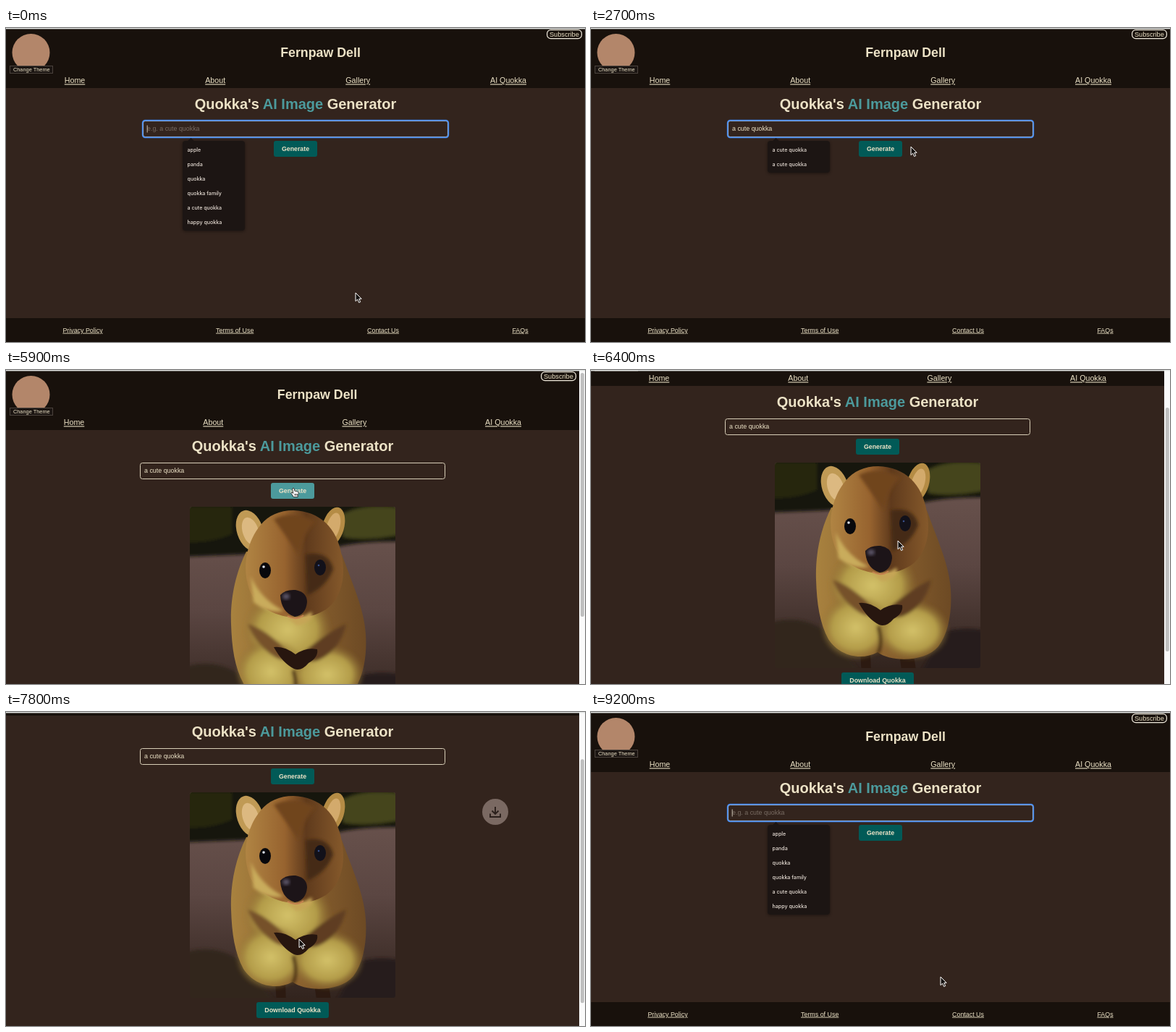
Animation of 800 by 434 pixels, one loop 9400 ms. Source, as an HTML page:

```html
<!DOCTYPE html>
<html lang="en">
<head>
<meta charset="utf-8">
<title>AI image generator</title>
<style>
  html, body { margin: 0; width: 100%; height: 100%; overflow: hidden; background: #33241d; }
  svg { display: block; width: 100vw; height: 100vh; }
  text { font-family: "Liberation Sans", Arial, sans-serif; fill: #ece2c6; white-space: pre; }
  .mid { text-anchor: middle; }
  .bold { font-weight: 700; }
  .link { text-decoration: underline; }
  .menu text { font: 500 7.1px Inter, "Liberation Sans", sans-serif; fill: #e8dfd6; }
</style>
</head>
<body>
<svg id="stage" viewBox="0 0 800 434">
  <defs>
    <linearGradient id="ground" x1="0" y1="0" x2="0" y2="1">
      <stop offset="0" stop-color="#6d5650"/>
      <stop offset=".5" stop-color="#5b4642"/>
      <stop offset="1" stop-color="#32241e"/>
    </linearGradient>
    <linearGradient id="fur" x1="0" y1="0" x2="1" y2="0">
      <stop offset="0" stop-color="#a8823f"/>
      <stop offset=".45" stop-color="#8f6531"/>
      <stop offset="1" stop-color="#6d4a24"/>
    </linearGradient>
    <linearGradient id="face" x1="0" y1="0" x2="1" y2="0">
      <stop offset="0" stop-color="#b08443"/>
      <stop offset=".4" stop-color="#97632f"/>
      <stop offset=".62" stop-color="#5f3a1c"/>
      <stop offset="1" stop-color="#85592b"/>
    </linearGradient>
    <radialGradient id="belly">
      <stop offset="0" stop-color="#d3c169"/>
      <stop offset=".65" stop-color="#b39c49"/>
      <stop offset="1" stop-color="#8a6c30" stop-opacity="0"/>
    </radialGradient>
    <filter id="soft" x="-20%" y="-20%" width="140%" height="140%"><feGaussianBlur stdDeviation="2.2"/></filter>
    <filter id="shade" x="-20%" y="-20%" width="140%" height="140%"><feGaussianBlur stdDeviation="2"/></filter>
    <clipPath id="frame"><rect width="284" height="284" rx="3"/></clipPath>
  </defs>

  <g id="page">
    <rect width="800" height="83" fill="#18110c"/>
    <circle cx="34.5" cy="34" r="26" fill="#b3866a"/>
    <rect x="5.5" y="52.5" width="59" height="10" fill="#1b1512" stroke="#4b433d"/>
    <text class="mid" x="35.3" y="60.3" font-size="7.4">Change Theme</text>
    <g id="subscribe">
      <rect x="747.6" y="2.6" width="47.8" height="12" rx="5" fill="#18110c" stroke="#efe9dc" stroke-width="1.2"/>
      <text class="mid" x="771.4" y="11.8" font-size="9.2">Subscribe</text>
    </g>
    <g id="links"></g>

    <g id="main">
      <text class="mid bold" x="400" y="112.2" font-size="20">Quokka's <tspan fill="#4c9a9c">AI Image</tspan> Generator</text>
      <rect id="field" x="189.5" y="128.5" width="421" height="22" rx="3" fill="none" stroke="#d9cfb8"/>
      <g id="focus" fill="none">
        <rect x="188.8" y="127.8" width="422.4" height="23.4" rx="3.5" stroke="#4389ee" stroke-width="2"/>
        <rect x="189.6" y="128.6" width="420.8" height="21.8" rx="2.8" stroke="#b9d2f5" stroke-width=".6"/>
      </g>
      <text id="typed" x="195" y="142.4" font-size="8.9"></text>
      <rect id="caret" y="134.5" width=".9" height="10" fill="#d8cfc0"/>
      <rect id="generate" x="370" y="156" width="60" height="22" rx="3"/>
      <text class="mid bold" x="400" y="170" font-size="8.8">Generate</text>
      <g id="download">
        <rect id="downloadBox" x="350" y="194" width="100" height="22" rx="3"/>
        <text class="mid bold" x="400" y="208" font-size="8.9">Download Quokka</text>
      </g>

      <g id="photo" transform="translate(258 189)" clip-path="url(#frame)">
        <rect width="284" height="284" fill="url(#ground)"/>
        <g filter="url(#soft)">
          <path d="M-9-9H293V48Q240 47 200 56L70 66L-9 69Z" fill="#15160d"/>
          <path d="M208 12Q240-6 293 2V38Q245 48 212 42Z" fill="#45451d"/>
          <path d="M-9 0H58V38Q25 52-9 48Z" fill="#26260f"/>
          <path d="M-9 222Q40 206 80 240L120 293H-9Z" fill="#33251f"/>
          <path d="M200 293L232 234Q262 226 293 232V293Z" fill="#281d1a"/>
        </g>
        <path d="M118 262L132 262L133 293H120ZM172 266L192 266L196 293H176Z" fill="#2c1a11"/>
        <g id="ears">
          <ellipse cx="83" cy="33" rx="18" ry="29" fill="#c09a55" transform="rotate(-18 83 33)"/>
          <ellipse cx="84" cy="34" rx="11" ry="20" fill="#dcb981" transform="rotate(-18 84 34)"/>
          <ellipse cx="198" cy="28" rx="15" ry="28" fill="#b58c45" transform="rotate(16 198 28)"/>
          <ellipse cx="198" cy="28" rx="9" ry="20" fill="#d3aa6c" transform="rotate(16 198 28)"/>
        </g>
        <path d="M78 62C60 98 56 135 57 162C58 195 62 222 74 244C88 266 118 275 142 262C160 276 208 276 226 254C240 236 245 206 243 176C241 142 226 110 210 66Z" fill="url(#fur)"/>
        <g filter="url(#soft)">
          <ellipse cx="135" cy="170" rx="62" ry="54" fill="url(#belly)"/>
          <ellipse cx="112" cy="228" rx="50" ry="46" fill="url(#belly)"/>
          <ellipse cx="190" cy="232" rx="52" ry="42" fill="url(#belly)"/>
          <path d="M143 226Q150 250 142 264" fill="none" stroke="#4f3518" stroke-width="5"/>
          <path d="M80 162Q104 168 142 206Q132 216 118 208Q92 192 80 162Z" fill="#76512a"/>
          <path d="M216 162Q192 172 156 202Q160 218 178 212Q208 198 216 162Z" fill="#5e3e20"/>
        </g>
        <path d="M116 194Q130 192 146 204Q160 194 176 197Q178 208 164 216Q154 228 144 224Q128 216 116 194Z" fill="#27160f"/>
        <path d="M143 5C180 6 204 30 210 68C216 100 208 128 188 142C174 150 166 152 152 153C128 155 92 142 82 114C70 78 82 44 98 25C108 12 124 5 143 5Z" fill="url(#face)"/>
        <g filter="url(#soft)">
          <path d="M116 17Q145 3 174 21Q158 34 150 66Q138 48 116 17Z" fill="#70441f"/>
          <path d="M84 96Q98 128 130 144Q108 148 88 132Z" fill="#c9ac5c"/>
          <path d="M160 66Q192 60 198 86Q188 112 162 122Z" fill="#442a18"/>
          <path d="M128 148Q146 160 168 145Q174 158 148 164Z" fill="#c6a557"/>
        </g>
        <ellipse cx="104" cy="88" rx="8" ry="11" fill="#08080c"/>
        <ellipse cx="180" cy="84" rx="8" ry="11" fill="#12111a"/>
        <circle cx="102" cy="83" r="1.8" fill="#dce2ef"/>
        <circle cx="178" cy="81" r="1.3" fill="#39508a"/>
        <path d="M125 122Q132 114 146 115Q162 118 162 132Q160 150 145 152Q126 146 125 122Z" fill="#1c1418"/>
        <ellipse cx="133" cy="124" rx="5" ry="4" fill="#5b5568" filter="url(#soft)"/>
        <path d="M135 151Q147 158 157 150" fill="none" stroke="#c5814f" stroke-width="2"/>
      </g>

      <g id="menu" class="menu">
        <rect id="menuShade" x="244" y="157" width="86" rx="4" fill="#000" opacity=".45" filter="url(#shade)"/>
        <path d="M250 157L255.500 152L261 157Z" fill="#1c1513"/>
        <rect id="menuBox" x="244" y="156" width="86" rx="4" fill="#1c1513"/>
        <g id="items"></g>
      </g>
    </g>

    <g id="footer"><rect width="800" height="34" fill="#18110c"/></g>
  </g>

  <g id="badge">
    <circle r="18" fill="#7a6962"/>
    <path d="M0-7V3M-4.500-1.500L0 3L4.500-1.500M-7 2.500V7H7V2.500" fill="none" stroke="#2a1f1b" stroke-width="1.9"/>
  </g>
  <g id="bar">
    <rect x="792" width="8" height="434" fill="#fafafa"/>
    <rect id="thumb" x="793.800" width="5" height="337" rx="2.500" fill="#bfbfbf"/>
  </g>
  <rect width="800" height="1.400" fill="#e3e6e4"/>

  <path id="arrow" d="M0 0V11.600L2.700 9.100L4.600 13.500L6.700 12.600L4.800 8.300H8.200Z" fill="#14100e" stroke="#fff" stroke-width="1"/>
  <g id="hand" stroke="#15110f" stroke-width=".8" stroke-linejoin="round">
    <path d="M-1.200 1Q0-.8 1.200 1L2 4.400Q3.200 3.600 3.900 4.800Q5 4.200 5.600 5.400Q7 5 7.200 6.500Q7.300 9 6.200 10.500V12.500H.2Q-1.400 9.500-3 7.600Q-3.300 6 -1.900 6.300L-.2 7.500Z" fill="#fff"/>
    <path d="M2 8V10.700M3.700 8V10.700M5.300 8V10.700" fill="none"/>
  </g>
</svg>
<script>
const LOOP = 9400, STEP = 100;
const PROMPT = "a cute quokka";
const TYPE_AT = 500, KEY_MS = 120, CLICK = 3400, REPLY = 4400, LOADED = 4900, RESET = 9000;
const $ = id => document.getElementById(id);
const set = (el, attrs) => { for (const k in attrs) el.setAttribute(k, attrs[k]); return el; };
const show = (id, on) => $(id).style.display = on ? "" : "none";
const move = (id, x, y) => set($(id), { transform: `translate(${x} ${y})` });

function addText(parent, str, attrs) {
  const el = document.createElementNS("http://www.w3.org/2000/svg", "text");
  el.textContent = str;
  return parent.appendChild(set(el, attrs));
}

// Labels placed relative to the page width
const spread = [];
function addSpread(parent, str, x, y, size, cls) {
  spread.push([addText(parent, str, { y, "font-size": size, class: "mid " + cls }), x / 800]);
}
addSpread($("links"), "Fernpaw Dell", 434.5, 40.4, 17.8, "bold");
[["Home", 95], ["About", 289.2], ["Gallery", 486.2], ["AI Quokka", 694]]
  .forEach(([s, x]) => addSpread($("links"), s, x, 76.4, 10.7, "link"));
[["Privacy Policy", 106], ["Terms of Use", 316.2], ["Contact Us", 521], ["FAQs", 710.5]]
  .forEach(([s, x]) => addSpread($("footer"), s, x, 19.6, 8.9, "link"));

const ALL = ["apple", "panda", "quokka", "quokka family", PROMPT, "happy quokka"];
const rows = ALL.map((s, i) => addText($("items"), s, { x: 250.5, y: 170.6 + 20 * i }));

// Tables of [time, ...values]
const POINTER = [
  [0, 483, 366], [2100, 483, 366], [2700, 442, 164], [2900, 442, 164], [3200, 397, 163],
  [6000, 397, 163], [6400, 424, 236], [6700, 424, 236], [7100, 400, 408], [7400, 400, 408],
  [7800, 405, 314], [8200, 415, 300], [8800, 483, 366]
];
const SCROLL = [[6000, 0], [6400, 61], [6700, 78], [8100, 78], [8500, 0]];
const BADGE = [[7400, 270, 0], [7600, 205, .8], [7800, 138, 1], [8000, 50, 1], [8200, -20, .6]];

function at(table, t) {
  const n = table.findIndex(row => row[0] > t);
  if (n === 0) return table[0].slice(1);
  if (n < 0) return table[table.length - 1].slice(1);
  const a = table[n - 1], b = table[n];
  const p = (t - a[0]) / (b[0] - a[0]);
  const ease = table === BADGE ? p : p * p * (3 - 2 * p);
  return a.slice(1).map((v, i) => v + (b[i + 1] - v) * ease);
}

function caretOn(t) {
  if (t < TYPE_AT) return true;
  const end = TYPE_AT + KEY_MS * PROMPT.length;
  return t < end || (t - end) % 1000 < 500;
}

function draw(now) {
  const clock = Math.floor(now % LOOP / STEP) * STEP;
  const t = clock < RESET ? clock : 0;
  const focused = t < CLICK, loaded = t >= LOADED;
  const width = loaded ? 792 : 800, shift = (width - 800) / 2;
  const [scroll] = at(SCROLL, t), [px, py] = at(POINTER, t);

  move("page", 0, -scroll);
  move("main", shift, 0);
  move("subscribe", width - 800, 0);
  move("footer", 0, loaded ? 520 : 401);
  spread.forEach(([el, x]) => el.setAttribute("x", x * width));

  const count = Math.max(0, Math.min(PROMPT.length, Math.floor((t - TYPE_AT) / KEY_MS)));
  const typed = $("typed");
  typed.textContent = count ? PROMPT.slice(0, count) : "e.g. a cute quokka";
  typed.style.fill = count ? "" : "#786b62";
  const end = count ? typed.getComputedTextLength() : 0;
  set($("caret"), { x: 194.7 + end });
  show("caret", focused && caretOn(t) && !(clock >= RESET && clock < RESET + 200));
  show("focus", focused);
  show("field", !focused);

  const list = count === 0 ? ALL : count === 1 ? ["apple", PROMPT, PROMPT] : [PROMPT, PROMPT];
  rows.forEach((row, i) => row.textContent = list[i] || "");
  const height = 20 * list.length + 4;
  set($("menuBox"), { height });
  set($("menuShade"), { height });
  show("menu", focused);

  const dropY = loaded ? 285 : 0;
  show("photo", loaded);
  show("download", t >= REPLY);
  move("download", 0, dropY);

  const over = (x, y, w) => px >= x + shift && px <= x + shift + w && py + scroll >= y && py + scroll <= y + 22;
  const onGenerate = over(370, 156, 60);
  const onDownload = t >= REPLY && over(350, 194 + dropY, 100);
  const tint = on => ({ fill: on ? "#4c9a9c" : "#015a57" });
  set($("generate"), tint(onGenerate));
  set($("downloadBox"), tint(onDownload));

  const hand = onGenerate || onDownload;
  show("hand", hand);
  show("arrow", !hand);
  move(hand ? "hand" : "arrow", px, py);

  const [by, alpha] = at(BADGE, t);
  show("badge", t >= 7400 && t < 8200);
  move("badge", 676, by);
  set($("badge"), { opacity: alpha });

  show("bar", loaded);
  set($("thumb"), { y: 4 + scroll * .785 });
}

const start = performance.now();
function tick() {
  draw(performance.now() - start);
  requestAnimationFrame(tick);
}
tick();
</script>
</body>
</html>
```
